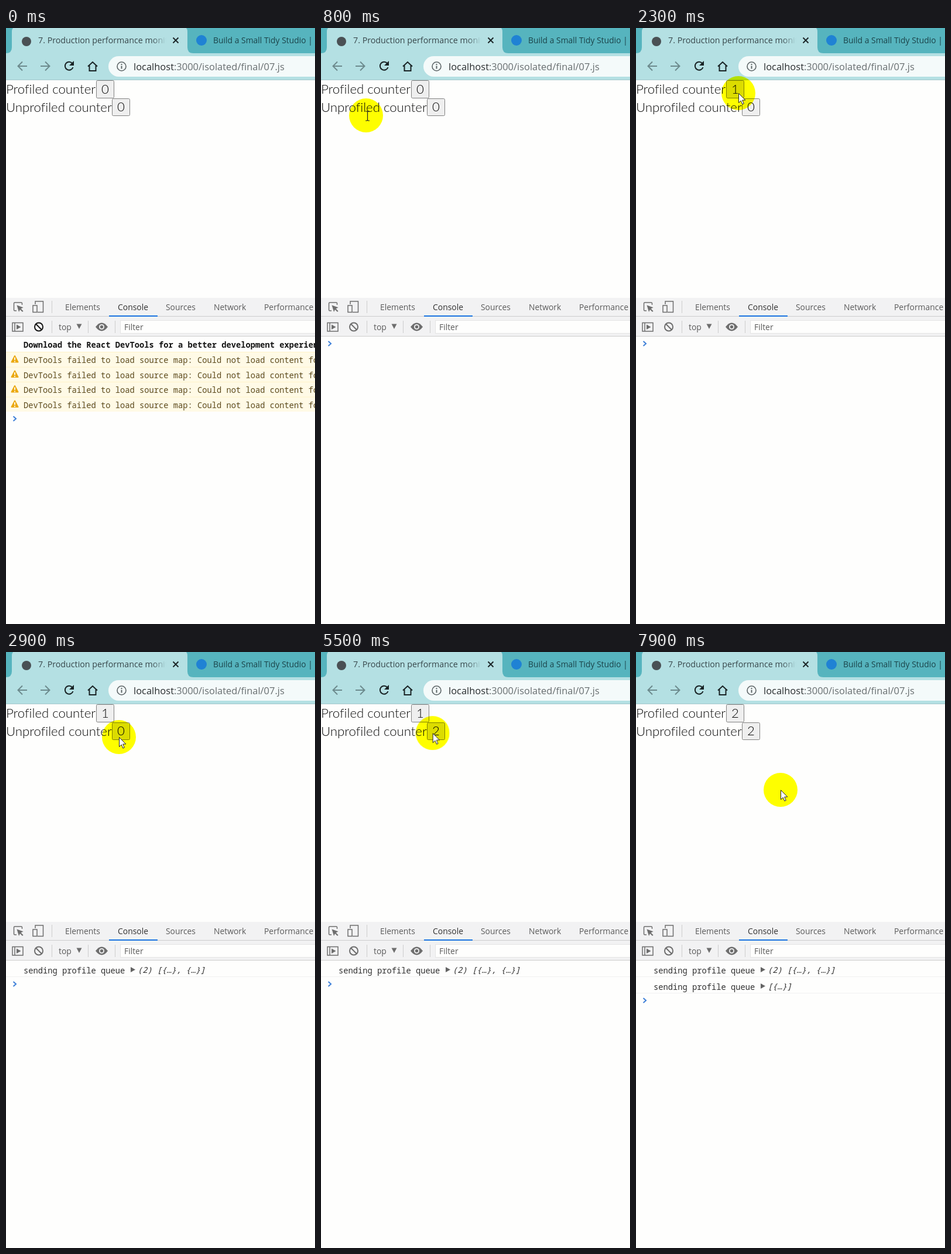
An HTML page that plays this animation: 528x1016 px, repeating every 8000 ms.

```html
<!DOCTYPE html>
<html lang="en">
<head>
<meta charset="utf-8">
<title>Profiled counter</title>
<style>
  html, body { margin: 0; width: 100%; height: 100%; overflow: hidden; background: #fefefd; }
  svg { display: block; }
  text { white-space: pre; }
  .ui { font: 13.9px "Open Sans", "Noto Sans", sans-serif; fill: #5a5a5a; }
  .page { font: 300 22.2px Lato, "Open Sans", sans-serif; font-variant-ligatures: none; fill: #0c0c0c; }
  .mono { font: 13.75px "Noto Sans Mono", "DejaVu Sans Mono", monospace; fill: #303030; }
  .bold { font-weight: 700; fill: #151515; }
  .italic { font-style: italic; }
  .warn { fill: #5c4a1c; }
  .line { fill: none; stroke: currentColor; stroke-width: 2; }
  .btn { fill: #efefef; stroke: #808080; }

  /* One loop is 8 s, so 1.25% is 100 ms */
  .anim { animation: 8s step-end infinite; }
  .move { animation-name: move; }
  .halo { fill: #ff0; mix-blend-mode: multiply; }
  .arrow { animation-name: arrow; }
  .ibeam { animation-name: ibeam; }
  .count1 { animation-name: count1; }
  .count2 { animation-name: count2; }
  .hover1 { animation-name: hover1; }
  .hover2 { animation-name: hover2; }
  .clear { animation-name: clear; }
  .warnings { animation-name: warnings; }
  .log1 { animation-name: log1; }
  .log2 { animation-name: log2; }
  .prompt { animation-name: prompt; }

  @keyframes move {
    0%     { transform: translate(57px, 510px); opacity: 0; }
    1.25%  { transform: translate(57px, 510px); opacity: 1; }
    2.5%   { transform: translate(57px, 510px); animation-timing-function: steps(1); }
    3.75%  { transform: translate(58px, 467px); animation-timing-function: steps(2); }
    6.25%  { transform: translate(43px, 296px); animation-timing-function: steps(3); }
    10%    { transform: translate(77px, 149px); animation-timing-function: steps(1); }
    11.25% { transform: translate(96px, 150px); animation-timing-function: steps(4); }
    16.25% { transform: translate(174px, 135px); animation-timing-function: steps(2); }
    18.75% { transform: translate(182px, 118px); animation-timing-function: steps(3); }
    22.5%  { transform: translate(168px, 106px); animation-timing-function: steps(3); }
    26.25% { transform: translate(175px, 111px); }
    28.75% { transform: translate(175px, 111px); animation-timing-function: steps(4); }
    33.75% { transform: translate(193px, 145px); }
    67.5%  { transform: translate(193px, 145px); animation-timing-function: steps(6); }
    75%    { transform: translate(179px, 104px); }
    87.5%  { transform: translate(179px, 104px); animation-timing-function: steps(3); }
    91.25% { transform: translate(246px, 238px); }
    92.5%  { transform: translate(246px, 238px); animation-timing-function: steps(2); }
    95%, 100% { transform: translate(247px, 235px); opacity: 1; }
  }
  @keyframes arrow { 0%, 18.75% { visibility: visible } 8.75% { visibility: hidden } }
  @keyframes ibeam { 0%, 18.75% { visibility: hidden } 8.75% { visibility: visible } }
  @keyframes count1 {
    0% { transform: none } 26.25% { transform: translateY(-40px) } 77.5%, 100% { transform: translateY(-80px) }
  }
  @keyframes count2 {
    0% { transform: none } 43.75% { transform: translateY(-40px) } 48.75%, 100% { transform: translateY(-80px) }
  }
  @keyframes hover1 {
    0%, 31.25%, 90%, 100% { fill: #efefef } 18.75%, 75%, 77.5% { fill: #dcdcdc } 76.25% { fill: #f5f5f5 }
  }
  @keyframes hover2 {
    0%, 73.75%, 100% { fill: #efefef } 31.25%, 43.75%, 48.75% { fill: #dcdcdc } 42.5%, 47.5% { fill: #f5f5f5 }
  }
  @keyframes clear { 0% { color: #151515 } 3.75%, 100% { color: #6e6e6e } }
  @keyframes warnings { 0% { visibility: visible } 2.5%, 100% { visibility: hidden } }
  @keyframes log1 { 0% { visibility: hidden } 35%, 100% { visibility: visible } }
  @keyframes log2 { 0% { visibility: hidden } 97.5%, 100% { visibility: visible } }
  @keyframes prompt {
    0% { transform: translateY(666px) }
    2.5% { transform: translateY(538px) }
    35% { transform: translateY(566px) }
    97.5%, 100% { transform: translateY(594px) }
  }
</style>
</head>
<body>
<svg width="528" height="1016" viewBox="0 0 528 1016">
  <defs>
    <linearGradient id="fade">
      <stop offset="0" stop-color="#b4e0e3" stop-opacity="0"/>
      <stop offset=".8" stop-color="#b4e0e3"/>
    </linearGradient>
    <g id="digits">
      <text x="9" y="23">0</text>
      <text x="9" y="63">1</text>
      <text x="9" y="103">2</text>
    </g>
    <g id="warning">
      <rect y="552" width="528" height="25.5" fill="#fffae6"/>
      <path d="M0 552.5H528" stroke="#fff3c8"/>
      <path d="M15 559L20.5 569.5H9.5Z" fill="#eba90f" stroke="#eba90f" stroke-width="2" stroke-linejoin="round"/>
      <path d="M15 561.5V566M15 567.5V569.5" stroke="#fff" stroke-width="1.8"/>
      <text class="mono warn" x="30" y="571">DevTools failed to load source map: Could not load content for</text>
    </g>
    <path id="expand" d="M0 0L8 4.5L0 9Z" fill="#646464"/>
  </defs>

  <rect width="528" height="1016" fill="#fefefd"/>

  <!-- Browser tabs -->
  <rect width="528" height="44" fill="#56b4be"/>
  <path d="M0 43Q10 43 10 33V6Q10 0 15 -2H305Q310 0 310 6V33Q310 43 320 43Z" fill="#b4e0e3"/>
  <circle cx="35" cy="23" r="8" fill="#4a5054"/>
  <text class="ui" x="55" y="26" style="font-size:14.25px;fill:#37464a">7. Production performance monit</text>
  <rect x="250" y="6" width="30" height="30" fill="url(#fade)"/>
  <path class="line" d="M285.5 16.5L294.5 25.5M294.5 16.5L285.5 25.5" color="#1d2729"/>
  <circle cx="334" cy="21" r="9" fill="#1f82d4"/>
  <text class="ui" x="354" y="26" style="fill:#1b4349">Build a Small Tidy Studio |</text>

  <!-- Address bar -->
  <rect y="43" width="528" height="45" fill="#b4e0e3"/>
  <rect y="88" width="528" height="1" fill="#a6c8cb"/>
  <rect x="175" y="48" width="380" height="35" rx="17.5" fill="#f4fafa"/>
  <path class="line" d="M36 65H21M28 57.5L20.5 65L28 72.5" color="#6c8a8d"/>
  <path class="line" d="M59 65H74M67 57.5L74.5 65L67 72.5" color="#6c8a8d"/>
  <path class="line" d="M113 60A7 7 0 1 0 114.5 67" color="#182224"/>
  <path d="M116 56V64H108Z" fill="#182224"/>
  <path class="line" d="M140 65.5L148 58L156 65.5M142.5 64V73H153.5V64" color="#182224"/>
  <circle class="line" cx="197.5" cy="65.5" r="7.5" color="#5c6466" style="stroke-width:1.6"/>
  <path class="line" d="M197.5 64.5V69.5M197.5 61V63" color="#5c6466"/>
  <text class="ui" x="218" y="71.5" style="font-size:16.47px;fill:#686e70"><tspan fill="#282c2e">localhost</tspan>:3000/isolated/final/07.js</text>

  <!-- Page -->
  <g class="page">
    <text x="0" y="112">Profiled counter</text>
    <text x="0" y="143">Unprofiled counter</text>
    <rect class="btn anim hover1" x="154.5" y="89.5" width="30" height="30" rx="2"/>
    <rect class="btn anim hover2" x="181.5" y="120.5" width="30" height="29" rx="2"/>
    <svg x="154" y="89" width="31" height="31"><use class="anim count1" href="#digits"/></svg>
    <svg x="181" y="119" width="31" height="31"><use class="anim count2" href="#digits"/></svg>
  </g>

  <!-- DevTools bars -->
  <rect y="460" width="528" height="66" fill="#f2f2f3"/>
  <path d="M0 491.5H528M0 525.5H528" stroke="#cdcdcd"/>
  <path d="M78.5 465V486M78.5 499V520M140.5 499V520M186.5 499V520" stroke="#cdcdcd"/>
  <rect x="176" y="490" width="83" height="2" fill="#1a73e0"/>
  <g color="#6e6e6e">
    <g class="line" style="stroke-width:1.5">
      <path d="M18 482H15Q13.5 482 13.5 480.5V469.5Q13.5 468 15 468H26Q27.5 468 27.5 469.5V472"/>
      <path d="M50 471V466H63.5V484.5H54M46 473H53V484.5H46Z"/>
      <path d="M11 502.5H29V517H11ZM15 502.5V517"/>
    </g>
    <path d="M18.5 472.5L29.5 476.5L25.5 478.5L29.5 482.5L28 484L24 480L22 484Z" fill="currentColor"/>
    <path d="M18 505.5L25.5 509.75L18 514Z" fill="currentColor"/>
    <path d="M120.5 504.5H129.5L125 513Z" fill="currentColor"/>
    <path d="M153 509.5Q163.5 495.5 174 509.5Q163.5 523.5 153 509.5Z" fill="currentColor"/>
    <circle cx="163.5" cy="509.5" r="4.5" fill="#f2f2f3"/>
    <circle cx="163.5" cy="509.5" r="2.7" fill="currentColor"/>
  </g>
  <g class="line anim clear">
    <circle cx="56" cy="509.5" r="7"/>
    <path d="M51 504.5L61 514.5"/>
  </g>
  <rect x="195.5" y="498.5" width="340" height="22" fill="#fefefd" stroke="#e4e4e4"/>
  <g class="ui">
    <text x="101" y="481">Elements</text>
    <text x="191" y="481" fill="#303030">Console</text>
    <text x="273" y="481">Sources</text>
    <text x="355" y="481">Network</text>
    <text x="441" y="481">Performance</text>
    <text x="90" y="515">top</text>
    <text x="202" y="515">Filter</text>
  </g>

  <!-- Console -->
  <g class="anim warnings">
    <text class="mono bold" x="30" y="545">Download the React DevTools for a better development experience</text>
    <use href="#warning"/>
    <use href="#warning" y="25.5"/>
    <use href="#warning" y="51"/>
    <use href="#warning" y="76.5"/>
  </g>
  <g class="anim log1">
    <text class="mono" x="30" y="548">sending profile queue</text>
    <use href="#expand" x="213" y="537"/>
    <text class="mono italic" x="225" y="546.5">(2) [{…}, {…}]</text>
    <path d="M0 553.5H528" stroke="#f1f1f1"/>
  </g>
  <g class="anim log2">
    <text class="mono" x="30" y="576">sending profile queue</text>
    <use href="#expand" x="213" y="565"/>
    <text class="mono italic" x="225" y="574.5">[{…}]</text>
    <path d="M0 581.5H528" stroke="#f1f1f1"/>
  </g>
  <path class="line anim prompt" d="M12.5 -4L17 0L12.5 4" color="#3f80d8"/>

  <!-- Pointer -->
  <circle class="halo anim move" r="29"/>
  <g class="anim move">
    <path class="anim arrow" d="M.5 .5V16.5L4.2 13L6.8 19L9.3 18L6.7 12H11.8Z" fill="#fff" stroke="#222"/>
    <path class="anim ibeam" d="M-1 -7H1.5L2.5 -6L3.5 -7H6M2.5 -6V8M-1 9H1.5L2.5 8L3.5 9H6" fill="none" stroke="#222" stroke-width="1.2"/>
  </g>
</svg>
</body>
</html>
```
